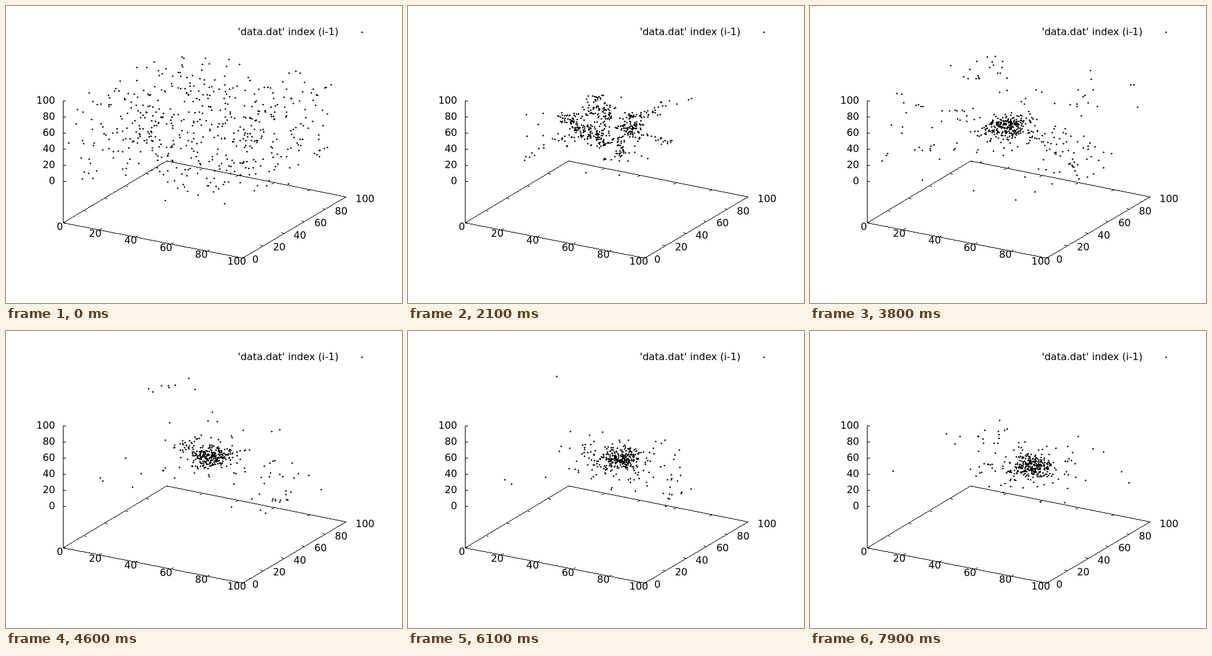
An HTML page with a canvas for the animation above (8 s loop, 640x480 px).

```html
<!DOCTYPE html>
<html lang="en">
<head>
<meta charset="utf-8">
<title>Particle plot</title>
<style>
  html, body { margin: 0; width: 100%; height: 100%; overflow: hidden; background: #fff; }
  canvas, svg { position: absolute; left: 0; top: 0; display: block; }
  text { font: 16px "DejaVu Sans", sans-serif; fill: #000; }
</style>
</head>
<body>
<canvas id="plot" width="640" height="480"></canvas>
<svg id="labels" width="640" height="480">
  <text x="537.5" y="47" text-anchor="end">'data.dat' index (i-1)</text>
</svg>
<script>
const ctx = document.getElementById('plot').getContext('2d');
const labels = document.getElementById('labels');

const LOOP = 8000, STEP = 100, FRAMES = LOOP / STEP;
const COUNT = 500, SUBSTEPS = 5, DT = STEP / 1000 / SUBSTEPS;
const PULL = 56000 / COUNT, SOFT = 9;

// Screen places of the outermost particles at the start
const RIM = [
  101,221, 113,190, 115,167, 124,171, 123,279, 126,268, 133,270, 140,278,
  121,245, 134,140, 140,154, 147,159, 123,217, 167,148, 184,121, 211,99,
  239,90, 284,82, 322,84, 360,86, 377,94, 328,93, 281,107, 394,120,
  427,132, 447,122, 457,108, 468,105, 475,108, 482,123, 515,132, 525,127,
  503,144, 511,168, 519,174, 514,230, 519,228, 507,233, 502,240, 496,152,
  456,287, 435,259, 421,290, 406,290, 401,298, 353,319, 335,300, 310,305,
  277,294, 257,314, 288,292, 193,273, 194,262
];

let seed = 20117;
function random() {
  seed = (seed + 0x6D2B79F5) | 0;
  let t = Math.imul(seed ^ (seed >>> 15), 1 | seed);
  t = (t + Math.imul(t ^ (t >>> 7), 61 | t)) ^ t;
  return ((t ^ (t >>> 14)) >>> 0) / 4294967296;
}

const project = (x, y, z) => [92 + 2.9 * x + 1.67 * y, 283 + 0.57 * x - 0.99 * y - 1.3 * z];
const inside = v => v >= 0 && v <= 100;

// All points of the box that lie behind one screen place
function sightLine(sx, sy) {
  const found = [];
  for (let y = 0; y <= 100; y += 0.5) {
    const x = (sx - 92 - 1.67 * y) / 2.9;
    const z = (283 + 0.57 * x - 0.99 * y - sy) / 1.3;
    if (inside(x) && inside(z)) found.push([x, y, z]);
  }
  return found;
}

function makeCloud() {
  const cloud = [];
  for (let i = 0; i < RIM.length; i += 2) {
    const line = sightLine(RIM[i], RIM[i + 1]);
    if (line.length) cloud.push(line[Math.floor(random() * line.length)]);
  }
  while (cloud.length < COUNT) {
    const p = [random() * 100, random() * 100, random() * 100];
    if (sightLine(...project(...p)).length > 36) cloud.push(p);
  }
  return cloud;
}

const cloud = makeCloud();
const axis = k => Float64Array.from(cloud, p => p[k]);
const zeros = () => new Float64Array(COUNT);
const px = axis(0), py = axis(1), pz = axis(2);
const vx = zeros(), vy = zeros(), vz = zeros();
const ax = zeros(), ay = zeros(), az = zeros();

function attract() {
  ax.fill(0); ay.fill(0); az.fill(0);
  for (let i = 0; i < COUNT; i++) {
    for (let j = i + 1; j < COUNT; j++) {
      const dx = px[j] - px[i], dy = py[j] - py[i], dz = pz[j] - pz[i];
      const d2 = dx * dx + dy * dy + dz * dz + SOFT;
      const f = PULL / (d2 * Math.sqrt(d2));
      ax[i] += f * dx; ay[i] += f * dy; az[i] += f * dz;
      ax[j] -= f * dx; ay[j] -= f * dy; az[j] -= f * dz;
    }
  }
}

function kick(h) {
  for (let i = 0; i < COUNT; i++) {
    vx[i] += ax[i] * h; vy[i] += ay[i] * h; vz[i] += az[i] * h;
  }
}

function drift(h) {
  for (let i = 0; i < COUNT; i++) {
    px[i] += vx[i] * h; py[i] += vy[i] * h; pz[i] += vz[i] * h;
  }
}

function advance() {
  for (let s = 0; s < SUBSTEPS; s++) {
    kick(DT / 2);
    drift(DT);
    attract();
    kick(DT / 2);
  }
}

// Only particles within the axis ranges are plotted
function snapshot() {
  const dots = [];
  for (let i = 0; i < COUNT; i++) {
    if (inside(px[i]) && inside(py[i]) && inside(pz[i])) {
      dots.push(project(px[i], py[i], pz[i]).map(Math.round));
    }
  }
  return dots;
}

attract();
const history = [snapshot()];
function dotsAt(n) {
  while (history.length <= n) {
    advance();
    history.push(snapshot());
  }
  return history[n];
}

function line(x0, y0, x1, y1) {
  const n = Math.max(Math.abs(x1 - x0), Math.abs(y1 - y0));
  for (let i = 0; i <= n; i++) {
    ctx.fillRect(Math.round(x0 + (x1 - x0) * i / n), Math.round(y0 + (y1 - y0) * i / n), 1, 1);
  }
}

function tick(x, y, dx, dy) {
  x = Math.round(x);
  y = Math.round(y);
  line(x, y, x + dx, y + dy);
}

function dot(x, y) {
  ctx.fillRect(x - 1, y, 3, 1);
  ctx.fillRect(x, y - 1, 1, 3);
}

function drawAxes() {
  line(92, 350, 382, 407);
  line(382, 407, 549, 308);
  line(549, 308, 259, 250);
  line(259, 250, 92, 350);
  line(92, 153, 92, 350);
  for (let v = 0; v <= 100; v += 20) {
    tick(92, 283 - 1.3 * v, 4, 0);
    tick(92 + 2.9 * v, 350 + 0.57 * v, 4, -2);
    tick(259 + 2.9 * v, 250 + 0.58 * v, -4, 2);
    tick(92 + 1.67 * v, 350 - v, 4, 1);
    tick(382 + 1.67 * v, 407 - 0.99 * v, -4, -1);
  }
  dot(575, 42);
}

function label(value, x, y, anchor) {
  const t = document.createElementNS(labels.namespaceURI, 'text');
  t.setAttribute('x', x);
  t.setAttribute('y', Math.round(y));
  t.setAttribute('text-anchor', anchor);
  t.textContent = value;
  labels.append(t);
}

for (let v = 0; v <= 100; v += 20) {
  label(v, 79.5, 288 - 1.3 * v, 'end');
  label(v, 87 + 2.86 * v, 362 + 0.56 * v, 'middle');
  label(v, 398 + 1.67 * v, 415 - 0.98 * v, 'start');
}

let shown = -1;
function draw(n) {
  if (n === shown) return;
  shown = n;
  ctx.fillStyle = '#fff';
  ctx.fillRect(0, 0, 640, 480);
  ctx.fillStyle = '#000';
  drawAxes();
  for (const [x, y] of dotsAt(n)) dot(x, y);
}

let start = null;
function loop(now) {
  if (start === null) start = now;
  draw(Math.floor(((now - start) % LOOP) / STEP) % FRAMES);
  requestAnimationFrame(loop);
}
draw(0);
requestAnimationFrame(loop);
</script>
</body>
</html>
```
